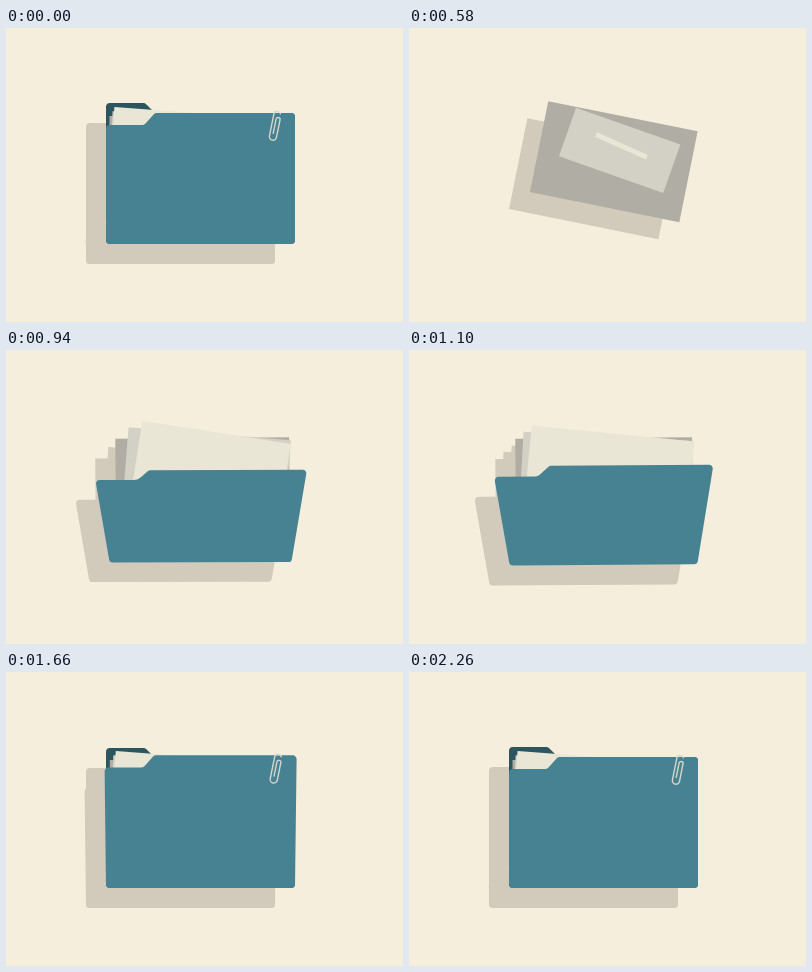
Animation, 397 px wide and 294 px high, one loop 7340 ms. Source, as an HTML page with a canvas:

```html
<!DOCTYPE html>
<html lang="en">
<head>
<meta charset="utf-8">
<title>Folder</title>
<style>
  html, body { margin: 0; width: 100%; height: 100%; overflow: hidden; background: #f5eedc; }
  canvas { display: block; }
</style>
</head>
<body>
<canvas id="stage" width="397" height="294"></canvas>
<script>
const ctx = document.getElementById('stage').getContext('2d');
const LOOP = 7340, INTRO = 100, STEP = 40;
const SHADOW = '#d2cbbb', FRONT = '#478293', BACK = '#2d555f', WIRE = '#d6d7ca';
const FRONT_START = 620, BACK_START = 1250, CLIP_START = 1480;

// x, top: resting middle of the top edge; rest: final angle;
// swing, wave, fade: starting tilt, its oscillation and its duration; lift: vertical bounce
const sheets = [
  { color: '#b0ada4', start: 130, w: 180, h: 125, x: 193.5, top: 88,
    rest: 0, swing: -29, wave: 2 * Math.PI / 1020, fade: 484, lift: 10 },
  { color: '#d3d1c5', start: 347, w: 178, h: 122, x: 192.5, top: 87.5,
    rest: 2.8, swing: 25, wave: 0, fade: 365, lift: 90 },
  { color: '#e9e6d6', start: 490, w: 177.5, h: 118, x: 192.5, top: 85.4,
    rest: 4.3, swing: 21, wave: 0, fade: 365, lift: 54 }
];

const rad = deg => deg * Math.PI / 180;
const grow = (age, tau) => age > 0 ? 1 - Math.exp(-age / tau) : 0;
const bell = x => Math.exp(-x * x);
const spring = age => Math.cos(Math.PI * age / 600) * Math.exp(-age / 190);

function outline(pts, radii) {
  const n = pts.length, end = pts[n - 1];
  ctx.beginPath();
  ctx.moveTo((end[0] + pts[0][0]) / 2, (end[1] + pts[0][1]) / 2);
  pts.forEach((p, i) => ctx.arcTo(...p, ...pts[(i + 1) % n], radii[i]));
  ctx.closePath();
  ctx.fill();
}

function drawSheet(s, t) {
  const age = t - s.start, g = grow(age, 240);
  const w = s.w * g, h = Math.max(5, s.h * grow(age - 85, 270));
  const tilt = s.rest + s.swing * bell(age / s.fade) * Math.cos(s.wave * age);
  ctx.save();
  ctx.translate(s.x + 20 * (1 - g ** 5), s.top + s.lift * spring(age) + h / 2);
  ctx.rotate(rad(tilt));
  ctx.fillRect(-w / 2, -h / 2, w, h);
  ctx.restore();
}

function drawBack(t) {
  const y = 75 + 55 * Math.exp((BACK_START - t) / 100);
  outline([[100, y], [139, y], [149, y + 10], [289, y + 10], [289, 216], [100, 216]],
    [4, 4, 4, 4, 4, 4]);
}

// The front cover leans out in perspective around its bottom edge
function frontPose(t) {
  const age = t - FRONT_START;
  const wide = grow(age, 98), tall = grow(age - 60, 130);
  const lean = rad(49 * bell((t - 1040) / 405));
  const point = (u, v) => {
    const scale = 1 / (1 - v * Math.sin(lean) / 640);
    return [u * wide * scale, -v * tall * Math.cos(lean) * scale];
  };
  return { age, tall, point };
}

function drawFront(t) {
  const { age, tall, point } = frontPose(t), r = 4 * tall;
  ctx.save();
  ctx.translate(194.5, 216 - 28 * (1 - tall));
  ctx.rotate(rad(6 * spring(age)));
  outline([point(-94.5, 119), point(-56.5, 119), point(-45.5, 131),
    point(94.5, 131), point(94.5, 0), point(-94.5, 0)],
    [r, 5 + 40 * (1 - tall), r, r, r, r]);
  ctx.restore();
}

function drawClip(t) {
  const [x, y] = frontPose(t).point(94.5, 131);
  const drop = 10 * Math.exp((CLIP_START - t) / 50);
  ctx.save();
  ctx.translate(269 + (x - 94.5) / 2, 98.5 + (y + 131) / 2 - drop);
  ctx.rotate(0.2);
  ctx.strokeStyle = WIRE;
  ctx.lineWidth = 1.4;
  ctx.lineCap = 'round';
  ctx.beginPath();
  ctx.moveTo(-0.4, 7);
  ctx.lineTo(-0.4, -7.5);
  ctx.arc(1.6, -7.5, 2, Math.PI, 0);
  ctx.lineTo(3.6, 10.3);
  ctx.arc(0, 10.3, 3.6, 0, Math.PI);
  ctx.lineTo(-3.6, -12);
  ctx.arcTo(-3.6, -15, 0, -15, 3);
  ctx.quadraticCurveTo(2.4, -15, 2.8, -13.5);
  ctx.stroke();
  ctx.restore();
}

const parts = [
  { start: BACK_START, color: BACK, paint: drawBack },
  ...sheets.map(s => ({ start: s.start, color: s.color, paint: t => drawSheet(s, t) })),
  { start: FRONT_START, color: FRONT, paint: drawFront }
];

function draw(t) {
  ctx.fillStyle = '#f5eedc';
  ctx.fillRect(0, 0, 397, 294);
  const shown = parts.filter(p => t > p.start);
  const bounce = 45 * spring(t - sheets[0].start);

  ctx.save();
  ctx.translate(-20 + 0.3 * bounce, 20 + bounce);
  ctx.fillStyle = SHADOW;
  shown.forEach(p => p.paint(t));
  ctx.restore();

  for (const p of shown) {
    ctx.fillStyle = p.color;
    p.paint(t);
  }
  if (t > CLIP_START) drawClip(t);
}

function tick() {
  const t = performance.now() % LOOP;
  draw(t < INTRO ? LOOP : INTRO + Math.floor((t - INTRO) / STEP) * STEP);
  requestAnimationFrame(tick);
}
tick();
</script>
</body>
</html>
```
